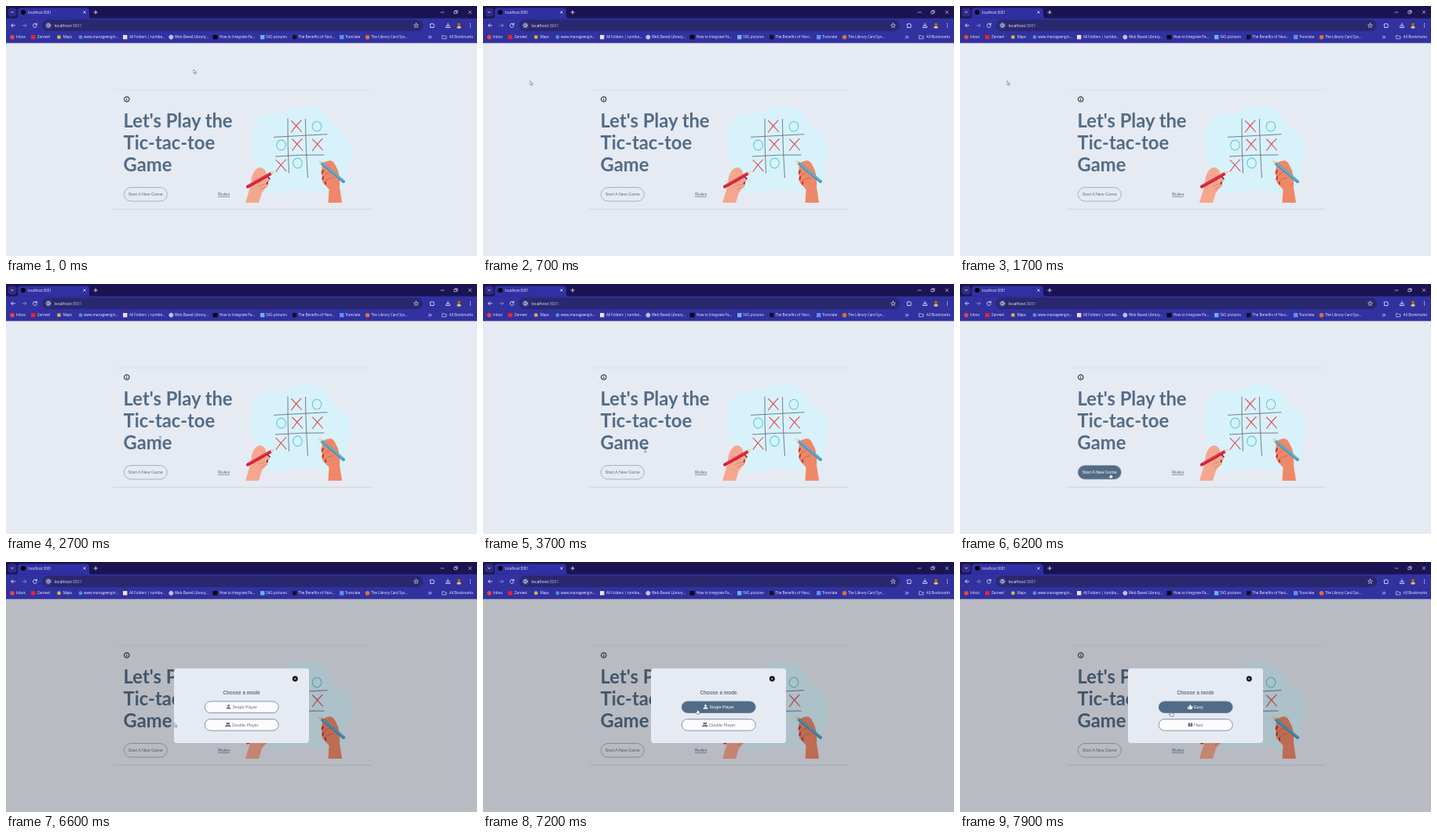
Write an HTML page that moves like this. It is 600 by 319 pixels and loops after 8 s.

```html
<!DOCTYPE html>
<html lang="en">
<head>
<meta charset="utf-8">
<title>Tic-tac-toe</title>
<style>
  html, body { margin: 0; width: 100%; height: 100%; overflow: hidden; background: #e6eaf2; }
  svg { display: block; width: 100%; height: 100%; }
  text { white-space: pre; }
  .ui { font: 4.55px "Open Sans", sans-serif; fill: #f2f2ff; }
  .tab { font-size: 4.4px; }
  .url { font-size: 5.2px; }
  .head { font: 700 23.75px Lato, sans-serif; fill: #526c87; }
  .btn { font: 5.35px "Liberation Sans", Arial, sans-serif; fill: currentColor; }
  .line { fill: none; stroke-linecap: round; stroke-linejoin: round; }

  .arrow, .beam, .hand, .modal, .mode, .level, .start, .first {
    animation: 8s step-end infinite;
  }
  .arrow { animation-name: arrow; }
  .beam { animation-name: beam; }
  .hand { animation-name: hand; }
  .modal { animation-name: modal; }
  .mode { animation-name: mode; }
  .level { animation-name: level; }
  .start { color: #5d738c; fill: #e6eaf2; animation-name: start; }
  .first, .second { color: #66717f; fill: #fdfdff; }
  .first { animation-name: first; }
  .pointer { animation: move 8s linear infinite; }

  @keyframes arrow { 0%, 82.5% { opacity: 1 } 30%, 88.75%, 100% { opacity: 0 } }
  @keyframes beam { 0%, 70%, 100% { opacity: 0 } 30% { opacity: 1 } }
  @keyframes hand { 0%, 82.5% { opacity: 0 } 70%, 88.75%, 100% { opacity: 1 } }
  @keyframes modal { 0% { opacity: 0 } 82.5%, 100% { opacity: 1 } }
  @keyframes mode { 0% { opacity: 1 } 93.75%, 100% { opacity: 0 } }
  @keyframes level { 0% { opacity: 0 } 93.75%, 100% { opacity: 1 } }
  @keyframes start {
    0%, 82.5%, 100% { color: #5d738c; fill: #e6eaf2 }
    70% { color: #fff; fill: #526c87 }
  }
  @keyframes first {
    0% { color: #66717f; fill: #fdfdff }
    88.75%, 100% { color: #fff; fill: #526c87 }
  }
  @keyframes move {
    0% { transform: translate(239px, 81px) }
    2.5% { transform: translate(239px, 81px); animation-timing-function: steps(4, start) }
    7.5% { transform: translate(60px, 95.5px) }
    28.75% { transform: translate(60px, 95.5px); animation-timing-function: steps(3, start) }
    32.5% { transform: translate(196.5px, 198px) }
    36.25% { transform: translate(196.5px, 198px); animation-timing-function: steps(2, start) }
    38.75% { transform: translate(206.7px, 211px) }
    67.5% { transform: translate(206.7px, 211px); animation-timing-function: steps(4, start) }
    72.5% { transform: translate(187px, 238px) }
    76.25% { transform: translate(187px, 238px); animation-timing-function: steps(2, start) }
    78.75% { transform: translate(191.5px, 241px) }
    82.5% { transform: translate(191.5px, 241px); animation-timing-function: steps(1, start) }
    83.75% { transform: translate(214.5px, 205.5px); animation-timing-function: steps(6, start) }
    91.25% { transform: translate(273px, 187px) }
    92.5% { transform: translate(273px, 187px); animation-timing-function: steps(6, start) }
    100% { transform: translate(268.8px, 190px) }
  }
</style>
</head>
<body>
<svg viewBox="0 0 600 319" preserveAspectRatio="none">
  <defs>
    <path id="cross" d="M-6.5-7Q0-1 6.5 7M6-7.5Q-1-1-6.5 7.5"/>
    <ellipse id="ring" rx="5.8" ry="6.4"/>
    <g id="person"><circle cy="-1.5" r="1.4"/><path d="M-2.7 2.5V1.6Q-2.4 .3 0 .3T2.7 1.6V2.5Z"/></g>
    <rect id="pill" width="94" height="14.6" rx="7.3" stroke="#687d96" stroke-width=".8"/>
  </defs>

  <!-- page -->
  <rect width="600" height="319" fill="#e6eaf2"/>
  <path d="M139 107H465" stroke="#d8dce4" stroke-width=".8"/>
  <path d="M136 259.3H465" stroke="#cbd0d9" stroke-width=".8"/>
  <g fill="none" stroke="#17191d">
    <circle cx="153.8" cy="119" r="3.3"/>
    <path d="M153.8 118.5V121M153.8 116.8V117.6"/>
  </g>
  <g class="head">
    <text x="149.6" y="154.9">Let's Play the</text>
    <text x="149.6" y="182.9">Tic-tac-toe</text>
    <text x="149.6" y="210.9">Game</text>
  </g>
  <g class="start">
    <rect x="150.3" y="231.5" width="55" height="17.6" rx="8.8" stroke="#8c9aae" stroke-width=".7"/>
    <text class="btn" x="177.7" y="242" text-anchor="middle">Start A New Game</text>
  </g>
  <text x="270" y="242" font-family="Lato, sans-serif" font-size="6.5" fill="#526c87">Rules</text>
  <path d="M270 243.5H285" stroke="#526c87" stroke-width=".6"/>

  <!-- illustration -->
  <path fill="#d7f2fa" d="M311.5 176C311 152 319 138 335 137.500C345 137.500 351 138 359 133C372 125 391 125 403 133C416 142 411 151 423 157C437 165 441 178 440 190C439 202 433 206 434 218C435 232 427 237 413 239C398 240 388 234 376 234C362 234 357 240 342 239.500C326 238 319 229 319 214C319 200 312 196 311.500 176Z"/>
  <g class="line" stroke="#55566d" stroke-width=".75">
    <path d="M359 144Q358.500 180 360.500 213M381.500 144.500Q382 185 384.500 219M341.500 167.300Q375 165.500 409 163.700M343.500 192Q375 189.500 405 190"/>
  </g>
  <g class="line" stroke="#e2505a" stroke-width="1.1">
    <use href="#cross" x="370" y="153.5"/>
    <use href="#cross" x="371.2" y="177"/>
    <use href="#cross" x="397" y="177"/>
    <use href="#cross" x="350.5" y="203.7"/>
  </g>
  <g class="line" stroke="#5fcbdc" stroke-width="1.1">
    <use href="#ring" x="396" y="153.6"/>
    <use href="#ring" x="350.5" y="177.5"/>
    <use href="#ring" x="371.5" y="200.5"/>
  </g>

  <!-- left hand -->
  <path fill="#f5a78e" d="M305 251L312 228Q312 216 317 210Q322 204 327 207Q332 210 331 215L336 220Q337 223 334 225Q335 230 330 233L326 238L322 251Z"/>
  <path class="line" d="M321 226L328 222M322 230L330 227M324 234L330 231" stroke="#c96a58" stroke-width=".6"/>
  <path class="line" d="M308 230.500L337 214" stroke="#d3203c" stroke-width="4.2"/>
  <path d="M336.500 212.300L342.500 210.500L338.500 215.800Z" fill="#f2cf9c"/>
  <path d="M309 228.700L336 213.500" stroke="#ef5a68" stroke-width=".7"/>
  <path class="line" d="M334 218.500L336 220.500M333 225L332.500 227" stroke="#7d1f3c" stroke-width="1.7"/>

  <!-- right hand -->
  <path fill="#ee8868" d="M410.500 251L411.500 234L405 227Q401 222 403 217Q400 213 402.500 208Q402 199 409 198Q416 195.500 419 202L423 210Q426 222 425 231L428 251Z"/>
  <path class="line" d="M416 211Q409 212 405 217M417 219Q411 219 406 224" stroke="#bd553f" stroke-width=".6"/>
  <path class="line" d="M402 200.500L430 224" stroke="#4c98bd" stroke-width="4"/>
  <path d="M403 200.500L430 223" stroke="#8ecbe2" stroke-width=".9"/>
  <path d="M400.500 202.500L397.500 196.800L403.500 198.700Z" fill="#f0d19f"/>
  <path class="line" d="M404 210L403 213M404 218L403.500 221M407 225L407 227" stroke="#c6243c" stroke-width="1.8"/>

  <!-- dialog -->
  <g class="modal">
    <rect y="47" width="600" height="272" opacity=".2"/>
    <rect x="214" y="135.7" width="172" height="95.3" rx="4" fill="#e6eaf2"/>
    <circle cx="368.3" cy="149" r="3.4" fill="#050608"/>
    <path d="M367.1 147.8L369.5 150.2M369.5 147.8L367.1 150.2" stroke="#fff" stroke-width=".8"/>
    <text x="300" y="168.7" text-anchor="middle" font-family="Liberation Sans, Arial, sans-serif" font-weight="700" font-size="6.35" fill="#687484">Choose a mode</text>
    <g class="first">
      <use href="#pill" x="253.2" y="177.9"/>
      <g class="mode" fill="currentColor">
        <use href="#person" x="283.5" y="185"/>
        <text class="btn" x="288.5" y="187">Single Player</text>
      </g>
      <g class="level" fill="currentColor">
        <path d="M290.2 184.5H291.4V188H290.2ZM291.9 184.5L293.2 182Q294.5 181.9 294 184H296.2Q296.6 187.4 294.9 188H291.9Z"/>
        <text class="btn" x="298" y="187">Easy</text>
      </g>
    </g>
    <g class="second">
      <use href="#pill" x="253.2" y="200.5"/>
      <g class="mode" fill="currentColor">
        <use href="#person" x="281.7" y="207.6"/>
        <use href="#person" x="283.8" y="207.6"/>
        <text class="btn" x="288" y="209.6">Double Player</text>
      </g>
      <g class="level" fill="currentColor">
        <ellipse cx="291.9" cy="207.7" rx="1.5" ry="2.6"/>
        <ellipse cx="294.9" cy="207.7" rx="1.5" ry="2.6"/>
        <text class="btn" x="298" y="209.6">Hard</text>
      </g>
    </g>
  </g>

  <!-- browser -->
  <rect width="600" height="47.3" fill="#3131a0"/>
  <rect width="600" height="15.7" fill="#1b1453"/>
  <path d="M12 15.8Q15 15.8 15 12V6Q15 2.5 18.5 2.5H102Q106 2.5 106 6V12Q106 15.8 109 15.8Z" fill="#3030a4"/>
  <rect x="2.5" y="2.5" width="11" height="11" rx="3.5" fill="#302b85"/>
  <rect x="46" y="17.5" width="485" height="14.6" rx="7.3" fill="#29286f"/>
  <circle cx="22" cy="8" r="3" fill="#050507"/>
  <circle cx="54" cy="24.8" r="4.8" fill="#3b3a86"/>
  <g class="line" stroke="#f0f0ff" stroke-width=".8">
    <path d="M6.5 7.2L8 8.7L9.5 7.2M98.7 6.7L101.3 9.3M101.3 6.7L98.7 9.3M112 8H116.4M114.2 5.8V10.2"/>
    <path d="M554 8H558M571.2 6.7H574.2V9.7H571.2ZM572.2 6.7V5.8H575.2V8.7H574.2M589.2 6L592.8 9.7M592.8 6L589.2 9.7" stroke-width=".6"/>
    <path d="M11.5 24.8H6.8M8.8 22.7L6.7 24.8L8.8 26.9"/>
    <path d="M21 24.8H25.7M23.7 22.7L25.8 24.8L23.7 26.9" opacity=".5"/>
    <path d="M39 23.5A2.5 2.5 0 1 0 39.3 25.7M39.3 22V23.9H37.4"/>
    <circle cx="54" cy="24.8" r="2.3"/>
    <path d="M54 24.6V26M54 23.4V23.5"/>
    <path d="M522.5 22L523.3 24L525.4 24.1L523.8 25.4L524.3 27.5L522.5 26.3L520.7 27.5L521.2 25.4L519.6 24.1L521.7 24Z" stroke-width=".6"/>
    <path d="M540.5 23H542Q542.6 21.2 543.5 23H545V24.4Q546.5 25.2 545 26V27.5H540.5V26Q542 25.2 540.5 24.4Z"/>
    <path d="M563 22V25.8M561.3 24.2L563 25.9L564.7 24.2M560.5 26V27.5H565.5V26"/>
    <path d="M538.3 38.2L539.8 39.7L538.3 41.2M540.5 38.2L542 39.7L540.5 41.2"/>
    <path d="M556 37.7H558L558.7 38.5H561V41.8H556Z" stroke-width=".6"/>
  </g>
  <circle cx="577" cy="24.8" r="4" fill="#4b3b50"/>
  <path d="M574 27.5Q577 23 580 27.5Q577 30 574 27.5Z" fill="#d9c0a8"/>
  <circle cx="577" cy="23.3" r="1.5" fill="#a9765a"/>
  <path class="line" d="M591.5 22.7h0M591.5 24.8h0M591.5 26.9h0" stroke="#f0f0ff" stroke-width="1.2"/>

  <!-- bookmark icons -->
  <circle cx="8" cy="39.7" r="2.7" fill="#e5483c"/>
  <rect x="32" y="37.2" width="5.4" height="5" fill="#f0202c"/>
  <circle cx="67.5" cy="39.7" r="2.4" fill="#d8b440"/>
  <circle cx="95" cy="39.7" r="2.4" fill="#4c93d8"/>
  <rect x="149" y="37" width="5.4" height="5.4" fill="#f0dfe4"/>
  <g fill="#8f8fd0" stroke="#f0f0ff" stroke-width=".7">
    <circle cx="210.3" cy="39.7" r="2.5"/>
    <path d="M207.8 39.7H212.8M210.3 37.2V42.2"/>
  </g>
  <rect x="263.5" y="36.9" width="6" height="5.6" fill="#0b0b10"/>
  <rect x="324" y="37" width="5.4" height="5.4" fill="#67b3ea"/>
  <rect x="365" y="37" width="5.4" height="5.4" fill="#14141c"/>
  <rect x="425" y="37" width="5.4" height="5.4" fill="#5d90ee"/>
  <circle cx="460.5" cy="39.7" r="2.8" fill="#d9703c"/>

  <g class="ui">
    <text class="tab" x="28.2" y="9.8">localhost:3001</text>
    <text class="url" x="61.5" y="26.7">localhost<tspan fill="#bdbddf">:3001</tspan></text>
    <text x="13" y="41.4">Inbox</text>
    <text x="40" y="41.4">Zanreel</text>
    <text x="72.7" y="41.4">Maps</text>
    <text x="99" y="41.4">www.manageengin...</text>
    <text x="157" y="41.4">All Folders | tumibe...</text>
    <text x="215" y="41.4">Web Based Library...</text>
    <text x="271.7" y="41.4">How to Integrate Pa...</text>
    <text x="331.2" y="41.4">SVG pictures</text>
    <text x="372.5" y="41.4">The Benefits of Havi...</text>
    <text x="432" y="41.4">Translate</text>
    <text x="465" y="41.4">The Library Card Sys...</text>
    <text x="564.8" y="41.4">All Bookmarks</text>
  </g>

  <!-- pointer, hot spot at 0,0 -->
  <g class="pointer">
    <path class="arrow" d="M0 0V5L1.2 4L2 5.8L2.9 5.4L2.1 3.7H3.7Z" fill="#fff" stroke="#34363c" stroke-width=".45"/>
    <path class="beam line" d="M-1-3.3H1M0-3.3V3.3M-1 3.3H1" stroke="#3c4049" stroke-width=".55"/>
    <path class="hand" d="M-.6 .4Q0-.4 .6 .4V2.6L3 3.2Q3.6 5.5 2.5 7H-.7L-2.4 4.4Q-2 3.5-.6 4.5Z" fill="#fff" stroke="#1a1a1f" stroke-width=".5"/>
  </g>
</svg>
</body>
</html>
```
